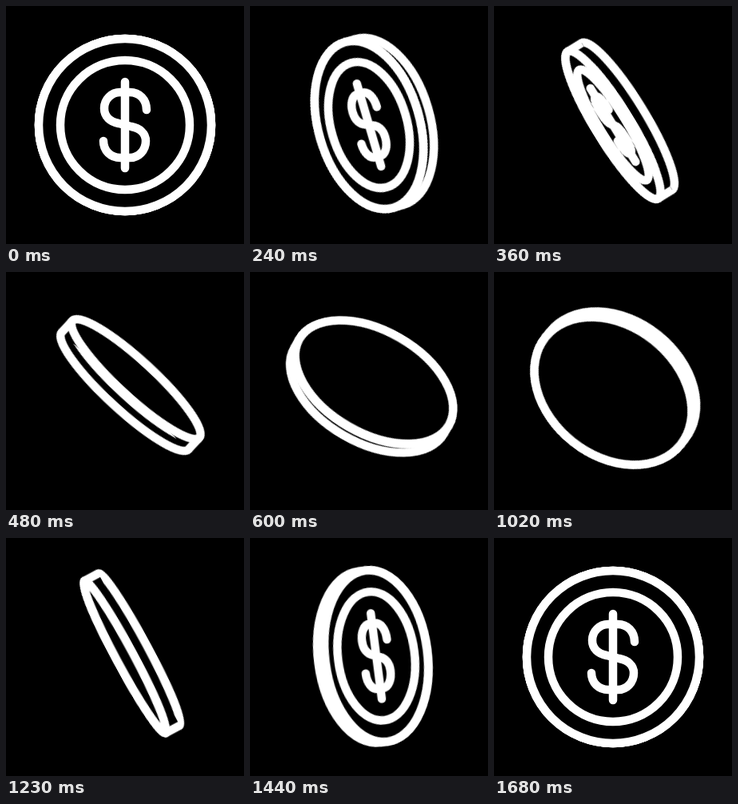
An HTML page without scripts that plays this animation: 298x298 px, repeating every 2100 ms.

```html
<!DOCTYPE html>
<html lang="en">
<head>
<meta charset="utf-8">
<title>Spinning coin</title>
<style>
html, body { margin: 0; width: 100%; height: 100%; overflow: hidden; background: #000; }
svg { display: block; width: 100%; height: 100%; }

svg * {
  animation-duration: 2.1s;
  animation-iteration-count: infinite;
  animation-timing-function: linear;
}
ellipse, path {
  stroke: #fff;
  stroke-width: 10.5;
  stroke-linecap: round;
  stroke-linejoin: round;
  fill: none;
}
ellipse { --r: 108px; rx: var(--r); ry: var(--r); animation-name: turn; }
.inner { --r: 81px; }
.coin { animation-name: lean; }
.far { animation-name: turn, slide; }
.band { fill: #fff; animation-name: widen; }
.face { animation-name: swap; }
.face .disc, .gap { fill: #000; }
.mark { animation-name: show; animation-timing-function: step-end; }
.sign { animation-name: squeeze; }

/* width of the disc as it spins */
@keyframes turn {
  0%, 40% { rx: var(--r); animation-timing-function: cubic-bezier(.333, 0, .667, .54); }
  20%, 60% { rx: .5px; animation-timing-function: cubic-bezier(.333, .46, .667, 1); }
  80%, 100% { rx: var(--r); }
}
@keyframes squeeze {
  0% {
    d: path("M27,-19 C27,-32 18,-41 6,-41 L-6,-41 C-17,-41 -26,-32 -26,-21 C-26,-10 -18,-4 -8,-2 L8,2 C18,4 26,10 26,20 C26,32 17,41 6,41 L-6,41 C-18,41 -27,32 -27,20");
    animation-timing-function: cubic-bezier(.333, 0, .667, .54);
  }
  20%, 60% {
    d: path("M0,-19 C0,-32 0,-41 0,-41 L0,-41 C0,-41 0,-32 0,-21 C0,-10 0,-4 0,-2 L0,2 C0,4 0,10 0,20 C0,32 0,41 0,41 L0,41 C0,41 0,32 0,20");
    animation-timing-function: cubic-bezier(.333, .46, .667, 1);
  }
  80%, 100% {
    d: path("M27,-19 C27,-32 18,-41 6,-41 L-6,-41 C-17,-41 -26,-32 -26,-21 C-26,-10 -18,-4 -8,-2 L8,2 C18,4 26,10 26,20 C26,32 17,41 6,41 L-6,41 C-18,41 -27,32 -27,20");
  }
}

/* tilt of the spin axis */
@keyframes lean {
  0% { transform: rotate(0deg); animation-timing-function: cubic-bezier(.333, 0, .667, 1); }
  35.714% { transform: rotate(-67deg); animation-timing-function: cubic-bezier(.333, 0, .667, 1); }
  77.143%, 100% { transform: rotate(0deg); }
}

/* visible thickness */
@keyframes slide {
  0% { cx: 0px; animation-timing-function: cubic-bezier(.333, .1, .667, 1); }
  20%, 40%, 60% { animation-timing-function: cubic-bezier(.333, 0, .667, 1); }
  20%, 60% { cx: 21.5px; }
  40%, 75.71%, 100% { cx: 0px; }
}
@keyframes widen {
  0% { width: 0px; animation-timing-function: cubic-bezier(.333, .1, .667, 1); }
  20%, 40%, 60% { animation-timing-function: cubic-bezier(.333, 0, .667, 1); }
  20%, 60% { width: 21.5px; }
  40%, 75.71%, 100% { width: 0px; }
}

/* the side nearest the viewer */
@keyframes swap {
  0%, 19.99%, 40%, 59.99% { transform: translateX(0px); }
  20%, 60% { transform: translateX(21.5px); animation-timing-function: cubic-bezier(.333, 0, .667, 1); }
  75.71%, 100% { transform: translateX(0px); }
}
@keyframes show {
  0%, 60%, 100% { visibility: visible; }
  20% { visibility: hidden; }
}
</style>
</head>
<body>
<svg viewBox="0 0 298 298">
  <g transform="translate(149 149)">
    <g class="coin">
      <ellipse/>
      <ellipse class="far"/>
      <rect class="band" y="-108" height="216" style="fill:#000"/>
      <rect class="band" y="-113.25" height="10.5"/>
      <rect class="band" y="102.75" height="10.5"/>
      <g class="face">
        <ellipse class="disc"/>
        <g class="mark">
          <ellipse class="inner"/>
          <path class="sign" d="M27,-19"/>
          <path d="M0,-54V54"/>
        </g>
      </g>
    </g>
  </g>
</svg>
</body>
</html>
```
